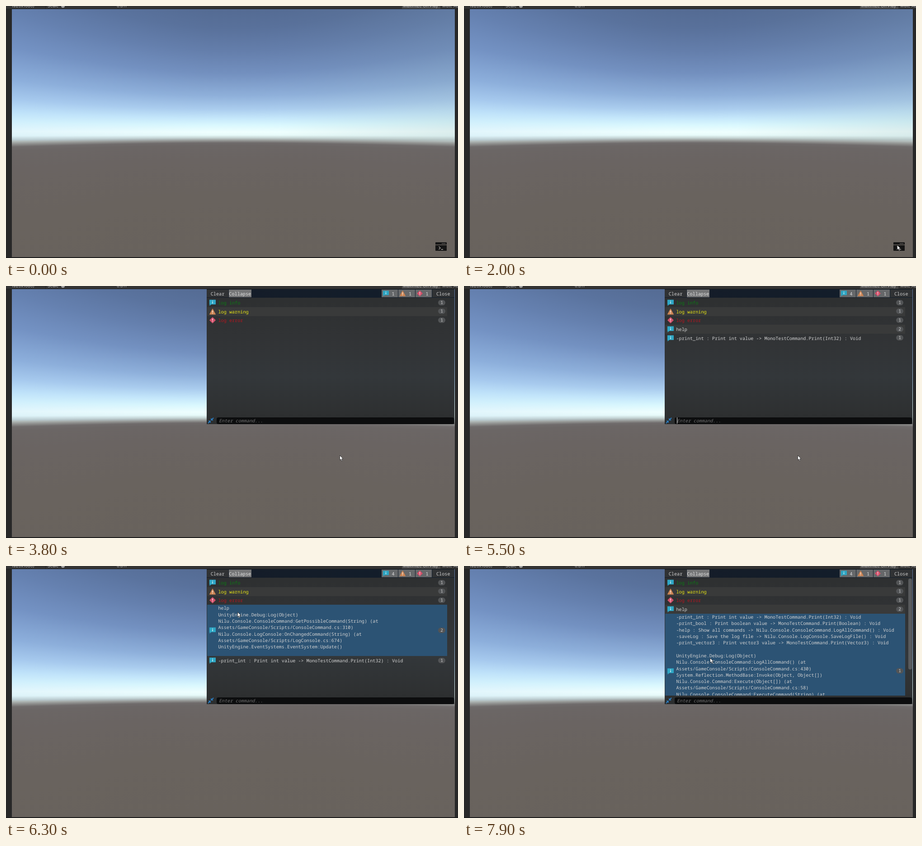
Recreate the animation shown at these times as an HTML page with a canvas. Size 1000 px wide and 560 px high, loop 8 s.

```html
<!DOCTYPE html>
<html lang="en">
<head>
<meta charset="utf-8">
<title>In-game console</title>
<style>
  html, body { margin: 0; width: 100%; height: 100%; overflow: hidden; background: #282828; }
  #stage { position: relative; width: 1000px; height: 560px; overflow: hidden; background: #282828; }
  #stage * { box-sizing: border-box; }
  #stage > *, .abs { position: absolute; }
  svg { display: block; overflow: visible; }

  #top { left: 0; top: 0; width: 1000px; height: 7px; overflow: hidden; background: #343434;
    border-bottom: 1px solid #232323; font: 9.3px/12px Inter, sans-serif; color: #bcbcbc; white-space: pre; }
  #top span { position: absolute; top: -6px; }
  #top i { position: absolute; top: 0; height: 6px; }
  #foot { left: 0; top: 558px; width: 1000px; height: 2px; background: #1d1d1d; }

  #panel { left: 443.5px; top: 7px; width: 548.5px; height: 300px; overflow: hidden;
    background: linear-gradient(#2d2f30, #313335 35%, #33373a 65%, #2e3031 92%, #2b2d2e);
    font: 10.18px/14.33px "Noto Sans Mono", monospace; color: #d2d2d2;
    white-space: pre; text-rendering: geometricPrecision; }
  #bar { left: 0; top: 0; width: 100%; height: 19px; background: linear-gradient(90deg, #151c28, #121e2b); }
  #bar .btn { position: absolute; top: 1px; height: 17px; line-height: 18px; text-align: center; background: #303234; }
  #bar .on { background: #757677; color: #e4e4e4; }
  #bar .count { background: #66686a; text-align: left; padding-left: 23px; color: #e0e0e0; }
  #bar .count svg { position: absolute; left: 3px; top: 2px; }
  #list { left: 1.5px; top: 20.5px; width: 530.5px; height: 260px; overflow: hidden; }
  .row { position: relative; min-height: 19.6px; padding-left: 24.5px; display: flex; align-items: center; }
  .row:nth-child(even) { background: #393a3a; }
  .row.open { background: #2c5374; align-items: flex-start; }
  .row svg { position: absolute; left: 5px; top: calc(50% - 7px); }
  .row b { position: absolute; left: 511px; top: calc(50% - 6.5px); width: 16px; height: 12px;
    border-radius: 6px; background: #525456; font-weight: 400; font-size: 9.5px; line-height: 12px; text-align: center; }
  #scroll { left: 539.5px; top: 21px; width: 8px; height: 202px; border-radius: 4px; background: #595b5d; }
  #field { left: 22.5px; top: 284.5px; width: 525px; height: 15px; border-radius: 4px;
    background: #0c0d0e; padding-left: 5px; line-height: 15.5px; }
  #field .hint { font-style: italic; color: #727272; }
  #caret { top: .5px; width: 1.4px; height: 14px; background: #e2e2e2; }
</style>
</head>
<body>
<div id="stage">
  <canvas id="sky" width="980" height="551" style="left:12.5px;top:7px"></canvas>
  <div id="top">
    <i style="left:87px;width:1px;background:#262626"></i>
    <i style="left:876px;width:85px;background:#4b4b4b"></i>
    <i style="left:122px;top:-4px;width:8px;height:8px;border-radius:4px;background:#a4a4a4"></i>
    <span style="right:937px">1920x1080)</span>
    <span style="left:92px">Scale</span>
    <span style="left:245px">0.811</span>
    <span style="left:878px">Maximize On Play</span>
    <span style="left:965px">Mute Audio</span>
  </div>
  <div id="foot"></div>

  <svg id="opener" width="25" height="19" style="left:950px;top:525px">
    <path d="M1 0H24Q25 0 25 1V5H0V1Q0 0 1 0ZM0 6.5H25V18Q25 19 24 19H1Q0 19 0 18Z" fill="#151515"/>
    <path d="M14.5 2.7h1.6m1.3 0h1.6m1.3 0h1.6" stroke="#8b8783" stroke-width="1.5"/>
    <path d="M7.5 9.5L11 12.7 7.5 16M12.5 16H17" fill="none" stroke="#aaa6a2" stroke-width="1.3"/>
  </svg>

  <div id="panel">
    <div id="bar" class="abs"></div>
    <div id="list" class="abs"></div>
    <div id="scroll" class="abs"></div>
    <svg class="abs" width="14" height="14" style="left:2px;top:285px" fill="#2c7fc4" stroke="#2c7fc4">
      <path d="M7.6 6.4V1.8L12.2 6.4ZM6.4 7.6V12.2L1.8 7.6Z" stroke-width=".5"/>
      <path d="M9 5L13 1M5 9L1 13" stroke-width="1.8"/>
    </svg>
    <div id="field" class="abs"><span id="typed"></span><div id="caret" class="abs"></div></div>
  </div>

  <svg id="mouse" width="8" height="13" style="left:0;top:0">
    <path d="M.5 .5V10.8L2.8 8.7 4.5 12.6 6.3 11.8 4.6 8H7.8Z" fill="#fff" stroke="#222" stroke-width=".8"/>
  </svg>
</div>

<script>
const LOOP = 8000, STEP = 100, CHAR = 6.108;
const $ = id => document.getElementById(id);

// Sky colours by height at the middle column; other columns stretch about the eye line.
const SKY = [
  [7, '#546b93'], [50, '#59719b'], [100, '#647eab'], [150, '#7390bf'], [200, '#8fb0da'],
  [230, '#abcdee'], [250, '#c6e8fb'], [265, '#daf8fe'], [280, '#effffe'], [287, '#e8fbfa'],
  [293, '#c5d4d3'], [299, '#959795'], [304, '#6f6b6b'], [310, '#6b6665'], [340, '#6a6462'],
  [420, '#69635e'], [558, '#68625c']
];

function paintSky() {
  const g = $('sky').getContext('2d'), eye = 276, focal = 477;
  for (let x = 0; x < 980; x += 2) {
    const s = Math.hypot(1, (x - 490) / focal);
    const grad = g.createLinearGradient(0, eye - 276 * s, 0, eye + 275 * s);
    for (const [y, color] of SKY) grad.addColorStop((y - 7) / 551, color);
    g.fillStyle = grad;
    g.fillRect(x, 0, 2, 551);
  }
  const shade = g.createLinearGradient(0, 0, 980, 0);
  shade.addColorStop(0, 'rgba(120,165,235,.1)');
  shade.addColorStop(.45, 'rgba(120,165,235,0)');
  shade.addColorStop(.6, 'rgba(90,115,120,0)');
  shade.addColorStop(1, 'rgba(90,115,120,.12)');
  g.fillStyle = shade;
  g.fillRect(0, 0, 980, 292);
}

const ICONS = {
  info: '<path d="M0 .5H14V11H4L.5 14.3V11H0Z" fill="#2fa6c4"/>' +
        '<path d="M7 2.4V4M7 5V9" stroke="#d9f2f7" stroke-width="1.5"/>',
  warn: '<path d="M7 .8L13.6 13H.4Z" fill="#cd8554" stroke="#cd8554" stroke-linejoin="round"/>' +
        '<path d="M7 4.6V9M7 10V11.6" stroke="#fbeee4" stroke-width="1.5"/>',
  error: '<path d="M7 .5L13.5 7 7 13.5 .5 7Z" fill="#d4516c" stroke="#d4516c" stroke-linejoin="round"/>' +
         '<path d="M7 3.4V7.8M7 8.9V10.5" stroke="#fbe6ea" stroke-width="1.5"/>'
};
const icon = (kind, size = 14) =>
  `<svg width="${size}" height="${size}" viewBox="0 0 14 14">${ICONS[kind]}</svg>`;

const PRINT = '-print_int : Print int value -> MonoTestCommand.Print(Int32) : Void';
const HELP_TRACE = `help
UnityEngine.Debug:Log(Object)
Nilu.Console.ConsoleCommand:GetPossibleCommand(String) (at
Assets/GameConsole/Scripts/ConsoleCommand.cs:310)
Nilu.Console.LogConsole:OnChangedCommand(String) (at
Assets/GameConsole/Scripts/LogConsole.cs:674)
UnityEngine.EventSystems.EventSystem:Update()
`;
const PRINT_TRACE = `${PRINT}
-print_bool : Print boolean value -> MonoTestCommand.Print(Boolean) : Void
-help : Show all commands -> Nilu.Console.ConsoleCommand.LogAllCommand() : Void
-saveLog : Save the log file -> Nilu.Console.LogConsole.SaveLogFile() : Void
-print_vector3 : Print vector3 value -> MonoTestCommand.Print(Vector3) : Void

UnityEngine.Debug:Log(Object)
Nilu.Console.ConsoleCommand:LogAllCommand() (at
Assets/GameConsole/Scripts/ConsoleCommand.cs:430)
System.Reflection.MethodBase:Invoke(Object, Object[])
Nilu.Console.Command:Execute(Object[]) (at
Assets/GameConsole/Scripts/ConsoleCommand.cs:58)
Nilu.Console.ConsoleCommand:ExecuteCommand(String) (at
`;

const escapeText = s => s.replace(/>/g, '&gt;');
function row(kind, text, count, color = '#d2d2d2', height = 0) {
  const open = height ? ` open" style="height:${height}px` : '';
  return `<div class="row${open}">${icon(kind)}<span style="color:${color}">` +
    `${escapeText(text)}</span><b>${count}</b></div>`;
}

function listRows(t) {
  const rows = [
    row('info', 'log info', 1, '#0d7a14'),
    row('warn', 'log warning', 1, '#e8e614'),
    row('error', 'log error', 1, '#b5161f')
  ];
  if (t >= 3900) {
    const open = t >= 6300 && t < 7400;
    rows.push(row('info', open ? HELP_TRACE : 'help', t < 4000 ? 1 : 2, undefined, open ? 114.2 : 0));
  }
  if (t >= 4900) {
    const open = t >= 7400;
    rows.push(row('info', open ? PRINT_TRACE : PRINT, 1, undefined, open ? 256 : 0));
  }
  return rows.join('');
}

const button = (x, w, cls, html) =>
  `<div class="btn ${cls}" style="left:${x}px;width:${w}px">${html}</div>`;
function toolbar(infos) {
  const count = (x, kind, n) => button(x, 36.5, 'count', icon(kind, 13) + n);
  return button(0.5, 48, '', 'Clear') + button(49.5, 49.5, 'on', 'Collapse') +
    count(387, 'info', infos) + count(424.5, 'warn', 1) + count(462, 'error', 1) +
    button(499.5, 48.5, '', 'Close');
}

// Last entry of a [time, value] table that has started.
const at = (table, t) => table.filter(e => e[0] <= t).pop()[1];

const INFOS = [[0, 1], [3900, 2], [4000, 3], [4900, 4]];
const TYPED = [[0, ''], [3900, 'h'], [4000, 'he'], [4400, 'help'], [4900, '']];
const CARET = [[0, true], [2700, false], [3200, true], [3800, false], [3900, true],
  [5000, false], [5500, true], [6100, false]];

// Pointer stops: time, x, y
const PATH = [
  [600, 983, 529], [1000, 900, 443], [1400, 826, 459], [2000, 958, 531],
  [2200, 958, 531], [2700, 738, 376], [5500, 738, 376], [6100, 512, 102],
  [6500, 512, 102], [7100, 531, 212], [7600, 531, 212], [7700, 533, 216], [7900, 544, 204]
];
function pointer(t) {
  const i = PATH.findIndex(p => p[0] > t);
  if (i < 0) return PATH[PATH.length - 1].slice(1);
  const [t0, x0, y0] = PATH[i - 1], [t1, x1, y1] = PATH[i];
  const u = (t - t0) / (t1 - t0), e = u * u * (3 - 2 * u);
  return [x0 + (x1 - x0) * e, y0 + (y1 - y0) * e];
}

const show = (id, on) => { $(id).style.visibility = on ? 'inherit' : 'hidden'; };

function render(t) {
  const open = t >= 2200;
  show('panel', open);
  show('opener', !open);
  show('mouse', t >= 600);
  if (t >= 600) {
    const [x, y] = pointer(t);
    $('mouse').style.transform = `translate(${x}px,${y}px)`;
  }
  if (!open) return;

  const text = at(TYPED, t);
  $('bar').innerHTML = toolbar(at(INFOS, t));
  $('list').innerHTML = listRows(t);
  $('typed').className = text ? '' : 'hint';
  $('typed').textContent = text || 'Enter command...';
  $('caret').style.left = 5 + text.length * CHAR + 'px';
  show('caret', at(CARET, t));
  show('scroll', t >= 7400);
}

let start, last = -1;
function tick(now) {
  start ??= now;
  const t = Math.floor(((now - start) % LOOP) / STEP) * STEP;
  if (t !== last) render(last = t);
  requestAnimationFrame(tick);
}

paintSky();
render(0);
requestAnimationFrame(tick);
</script>
</body>
</html>
```
